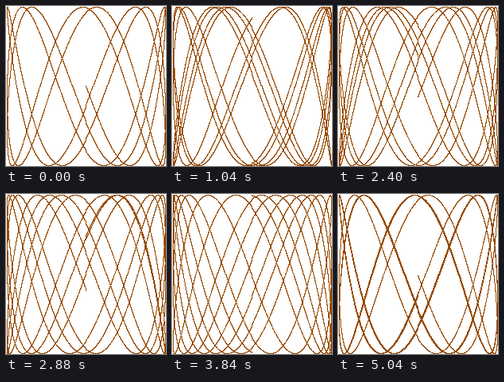
Animation, 201 px wide and 201 px high, one loop 5120 ms. Source, as an HTML page with a canvas:

```html
<!DOCTYPE html>
<html lang="en">
<head>
<meta charset="utf-8">
<title>Lissajous figure</title>
<style>
  html, body { margin: 0; width: 100%; height: 100%; overflow: hidden; background: #fff; }
  canvas { display: block; width: 201px; height: 201px; image-rendering: pixelated; }
</style>
</head>
<body>
<canvas id="stage" width="201" height="201"></canvas>
<script>
const RADIUS = 100;
const SIZE = 2 * RADIUS + 1;
const CYCLES = 5;
const STEP = 0.001;
const FREQUENCY = 35 / 13;
const STEPS_PER_LOOP = 64;
const STEP_MS = 80;
const PHASE_STEP = 0.1;
const WHITE = 0xffffffff;
const BROWN = 0xff004b96; // ABGR

const ctx = document.getElementById('stage').getContext('2d');
const image = ctx.createImageData(SIZE, SIZE);
const pixels = new Uint32Array(image.data.buffer);

const toPixel = v => RADIUS + Math.trunc(v * RADIUS + 0.5);

function draw(phase) {
  pixels.fill(WHITE);
  for (let t = 0; t < CYCLES * 2 * Math.PI; t += STEP) {
    const x = toPixel(Math.sin(t));
    const y = toPixel(Math.sin(t * FREQUENCY + phase));
    pixels[y * SIZE + x] = BROWN;
  }
  ctx.putImageData(image, 0, 0);
}

const start = performance.now();
let shown = -1;

function tick() {
  const elapsed = performance.now() - start;
  const index = Math.floor(elapsed / STEP_MS) % STEPS_PER_LOOP;
  if (index !== shown) {
    shown = index;
    draw(index * PHASE_STEP);
  }
  requestAnimationFrame(tick);
}
tick();
</script>
</body>
</html>
```
